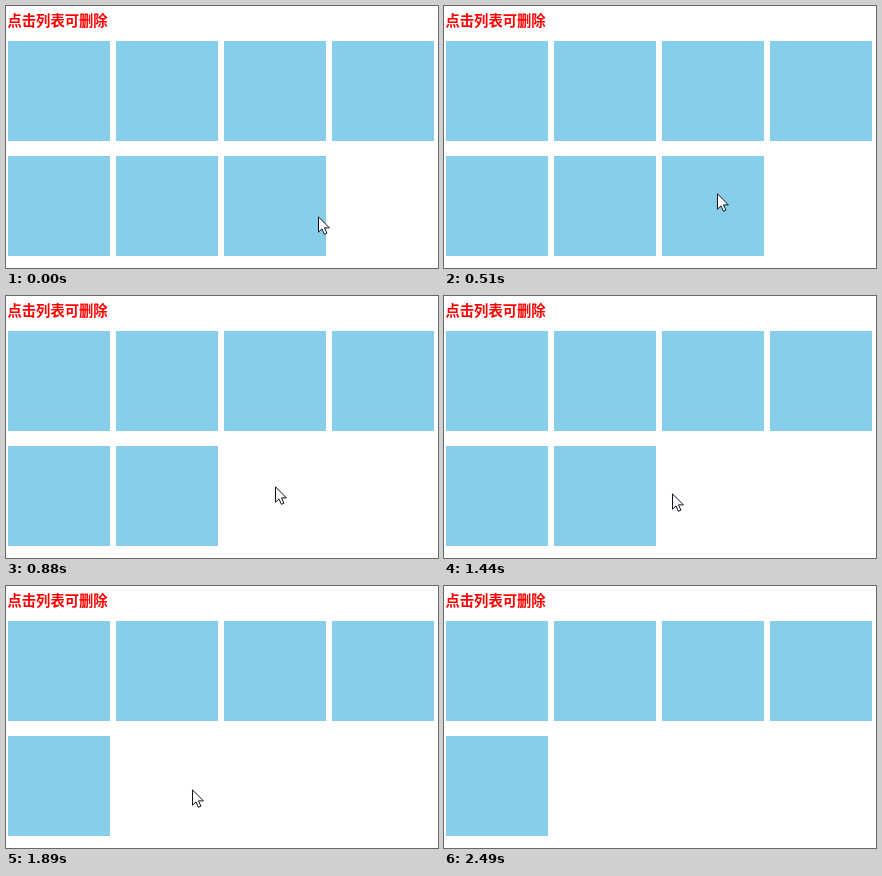
Recreate the animation shown at these times as an HTML page. Size 432 by 262 pixels, loop 4.17 s.

```html
<!DOCTYPE html>
<html lang="zh-CN">
<head>
<meta charset="utf-8">
<title>点击列表可删除</title>
<style>
  html, body { margin: 0; width: 100%; height: 100%; overflow: hidden; background: #fff; }
  svg { display: block; width: 100%; height: 100%; }
  text { font: bold 14.3px "Noto Sans CJK SC", "Noto Sans CJK", sans-serif; fill: #f00; }
  rect { fill: #87ceeb; }
  path { fill: #fff; stroke: #10101c; stroke-width: 1; }
</style>
</head>
<body>
<svg viewBox="0 0 432 262">
  <text x="1.5" y="19.7">点击列表可删除</text>
  <g id="tiles"></g>
  <path id="cursor" d="M.5 .8V16.2L4 12.9L6.4 18.3L8.9 17.2L6.5 11.9H11.4Z"/>
</svg>
<script>
const LOOP = 4170;
const HIDE_AT = 2490;
const START = [312, 210];

// The pointer jumps in equal steps, the first at `from`, the last at `to`.
const moves = [
  { from: 60, to: 200, steps: 3, end: [276, 183] },
  { from: 430, to: 650, steps: 4, end: [269, 190] },
  { from: 1440, to: 1500, steps: 2, end: [186, 203] },
  { from: 2270, to: 2417, steps: 3, end: [176, 214] }
];

const tiles = document.getElementById('tiles');
const cursor = document.getElementById('cursor');

function addTile(i) {
  const tile = document.createElementNS('http://www.w3.org/2000/svg', 'rect');
  const box = { x: 2 + (i % 4) * 108, y: i < 4 ? 35 : 150, width: 102, height: 100 };
  for (const key in box) tile.setAttribute(key, box[key]);
  return tiles.appendChild(tile);
}

for (let i = 0; i < 5; i++) addTile(i);
const removable = [
  { tile: addTile(5), until: 1890 },
  { tile: addTile(6), until: 880 }
];

function pointerAt(t) {
  let pos = START;
  for (const { from, to, steps, end } of moves) {
    if (t < from) break;
    const step = Math.floor((t - from) / (to - from) * (steps - 1)) + 1;
    const p = Math.min(step / steps, 1);
    pos = pos.map((v, i) => Math.round(v + (end[i] - v) * p));
  }
  return pos;
}

function show(el, on) {
  el.setAttribute('visibility', on ? 'visible' : 'hidden');
}

function draw(t) {
  removable.forEach(({ tile, until }) => show(tile, t < until));
  cursor.setAttribute('transform', `translate(${pointerAt(t)})`);
  show(cursor, t < HIDE_AT);
}

function tick() {
  draw((performance.now() - begin) % LOOP);
  requestAnimationFrame(tick);
}

const begin = performance.now();
tick();
</script>
</body>
</html>
```
